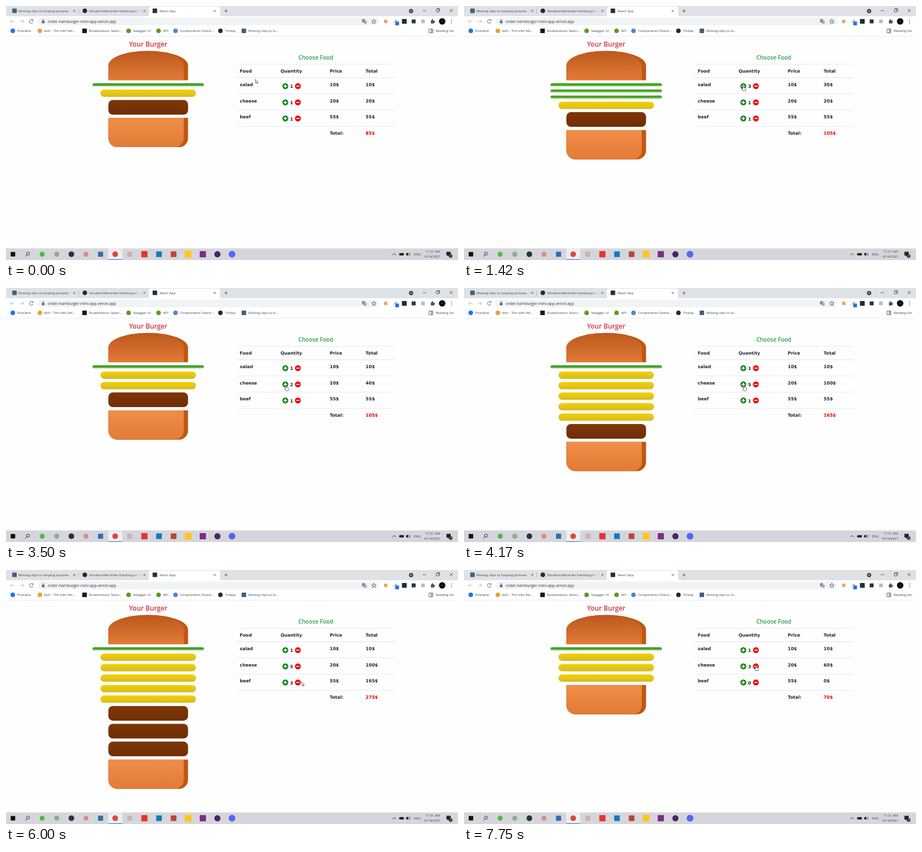
Recreate the animation shown at these times as an HTML page. Size 800x450 px, loop 8 s.

```html
<!DOCTYPE html>
<html lang="en">
<head>
<meta charset="utf-8">
<title>Burger order</title>
<style>
  html, body { margin: 0; width: 100%; height: 100%; overflow: hidden; background: #fefefe; }
  svg { display: block; width: 800px; height: 450px; }
  text { font-family: "Open Sans", "Noto Sans", sans-serif; font-size: 6px; fill: #3c4043; white-space: pre; }
  .title { font-weight: 600; text-anchor: middle; }
  .cell { font: bold 7.75px "DejaVu Sans", Verdana, sans-serif; fill: #212529; }
  .sum { fill: #e00000; }
  .line { fill: none; stroke: #50545a; stroke-width: .9; }
</style>
</head>
<body>
<svg viewBox="0 0 800 450" xmlns="http://www.w3.org/2000/svg">
  <defs id="defs"></defs>
  <g id="chrome"></g>
  <g id="burger"></g>
  <g id="table"></g>
  <g id="taskbar"></g>
  <g id="cursor">
    <path id="arrow" d="M0 0V6.6L1.6 5.2L2.7 7.7L3.7 7.2L2.7 4.9H4.8Z" fill="#fff" stroke="#222" stroke-width=".6"/>
    <path id="hand" d="M-.9 .8Q0 -.4 .9 .8V3.3L3.6 4Q4.4 4.2 4.3 5.2L3.6 9H-1L-3 5.8Q-3 4.8 -2 5L-.9 5.9Z" fill="#fff" stroke="#222" stroke-width=".65"/>
  </g>
</svg>
<script>
const LOOP = 8000, STEP = 1000 / 12;
const $ = id => document.getElementById(id);

// ---------- drawing helpers ----------
const rect = (x, y, w, h, fill, r = 0) => `<rect x="${x}" y="${y}" width="${w}" height="${h}" rx="${r}" fill="${fill}"/>`;
const disc = (x, y, r, fill) => `<circle cx="${x}" cy="${y}" r="${r}" fill="${fill}"/>`;
const box = (x, y, size, fill) => rect(x - size / 2, y - size / 2, size, size, fill, .8);
const line = (d, extra = "") => `<path class="line" d="${d}" ${extra}/>`;
const text = (x, y, s, extra = "") => `<text x="${x}" y="${y}" ${extra}>${s}</text>`;
const cell = (x, y, s, id = "") => text(x, y, s, `class="cell" id="${id}"`);
const cross = (x, y, r) => line(`M${x - r} ${y - r}l${2 * r} ${2 * r}m0 ${-2 * r}l${-2 * r} ${2 * r}`);
const gradient = (id, a, b) => `<linearGradient id="${id}" x2="0" y2="1"><stop stop-color="${a}"/><stop offset="1" stop-color="${b}"/></linearGradient>`;

// ---------- burger ----------
const MID = 251.7, TOP = 79.5, GAP = 5.6, BUN_W = 141, BUN_H = 52, SHADE = 7.6;
const FOODS = [
  { name: "salad", price: 10, max: 4, w: 197.2, h: 5.2, r: 2.6, colors: ["#228c1d", "#83c64a"] },
  { name: "cheese", price: 20, max: 5, w: 169, h: 13, r: 6.4, colors: ["#f4d004", "#d6bb22"] },
  { name: "beef", price: 55, max: 3, w: BUN_W, h: 26, r: 8, colors: ["#7f3608", "#702e05"] }
];
const BUNS = {
  topBun: { d: `M0 52V26A70.5 26 0 0 1 141 26V52Z`, colors: ["#bc581e", "#e27b36"] },
  lowBun: { d: `M0 0H141V36A16 16 0 0 1 125 52H16A16 16 0 0 1 0 36Z`, colors: ["#f08e4a", "#e27b36"] }
};

function bun(id) {
  const { d } = BUNS[id];
  return `<g id="${id}" transform="translate(${MID - BUN_W / 2} ${TOP})"><path d="${d}" fill="#c15711"/>
    <g clip-path="url(#${id}Clip)"><path d="${d}" fill="url(#${id}Fill)" transform="translate(${-SHADE} 0)"/></g></g>`;
}

function drawBurger() {
  $("defs").innerHTML =
    FOODS.map(f => gradient(f.name + "Fill", ...f.colors)).join("") +
    Object.entries(BUNS).map(([id, b]) =>
      gradient(id + "Fill", ...b.colors) + `<clipPath id="${id}Clip"><path d="${b.d}"/></clipPath>`).join("") +
    `<linearGradient id="fade"><stop stop-color="#dee1e6" stop-opacity="0"/><stop offset="1" stop-color="#dee1e6"/></linearGradient>`;
  $("burger").innerHTML =
    text(MID, 71.6, "Your Burger", `class="title" style="font-size:11.8px;fill:#d0323f"`) + bun("topBun") + bun("lowBun") +
    FOODS.map(f => `<g id="${f.name}">` +
      rect(MID - f.w / 2, 0, f.w, f.h, `url(#${f.name}Fill)`, f.r).repeat(f.max) + `</g>`).join("");
}

// ---------- order table ----------
const PLUS_X = 494.4, MINUS_X = 516.6, ROWS = [142, 170.8, 199.2];
const COLS = [413.8, 486, 573, 636.6];

function button(x, y, color, plus) {
  return disc(x, y, 5.2, color) + rect(x - 3, y - .85, 6, 1.7, "#fff") + (plus ? rect(x - .85, y - 3, 1.7, 6, "#fff") : "");
}

function drawTable() {
  let out = text(548.4, 95.2, "Choose Food", `class="title" style="font-size:10px;fill:#2b9c48"`);
  [103.2, 127, 155.8, 184.5, 213.3].forEach((y, i) =>
    out += rect(407.5, y - .4, 282, i === 1 ? 1 : .7, "#dee2e6"));
  ["Food", "Quantity", "Price", "Total"].forEach((s, i) => out += cell(COLS[i], 117.7, s));
  FOODS.forEach((f, i) => {
    const y = ROWS[i];
    out += cell(COLS[0], y, f.name) + cell(COLS[2], y, f.price + "$") + cell(COLS[3], y, "", f.name + "Cost") +
      button(PLUS_X, y, "#0b800b", true) + button(MINUS_X, y, "#f00000", false) + cell(502.8, y + 3.4, "", f.name + "Count");
  });
  $("table").innerHTML = out + cell(COLS[2], 228, "Total:") +
    text(COLS[3], 228, "", `class="cell sum" id="sum"`);
}

// ---------- browser frame ----------
function drawChrome() {
  let out = rect(0, 0, 800, 18.5, "#dee1e6") +
    `<path d="M250 18.5Q253 18.5 253 15V4Q253 1 256 1H376Q379 1 379 4V15Q379 18.5 382 18.5Z" fill="#fff"/>` +
    rect(0, 18.2, 800, 35.4, "#fff") + rect(0, 53.3, 800, .7, "#e3e5e8") +
    box(15, 8.5, 8, "#456078") + text(22, 11, "Moving clips to looping pictures", `style="font-size:6.05px"`) +
    disc(139.5, 8.5, 4, "#24292e") + text(147.5, 11, "khoabrindle/order-hamburger-m") +
    rect(222, 3, 18, 12, "url(#fade)") + rect(239, 3, 3, 12, "#dee1e6") +
    box(263.5, 8.5, 8, "#20303a") + text(272, 11, "React App") +
    [121, 245, 369.5].map(x => cross(x, 8.7, 1.8)).join("") + rect(128, 4.5, .6, 9, "#9a9da3") +
    line("M386.5 8.8h6M389.5 5.8v6") +
    disc(717, 9, 3.8, "#3c4043") + `<path d="M715.4 8.2h3.2l-1.6 2.2z" fill="#fff"/>` +
    line("M737.5 8.3h6M761.5 5.8h4.6v4.6h-4.6zM763 5.8v-1.3h4.5v4.5h-1.3", `stroke-width=".7"`) + cross(788, 8, 2.6);

  out += line("M14.5 27.2H8M11 24.2l-3 3l3 3", `opacity=".45"`) + line("M25 27.2h6.5M28.5 24.2l3 3l-3 3", `opacity=".45"`) +
    line("M47.4 25.2A3.3 3.3 0 1 0 48 28M48 23.4v2.4h-2.4") +
    rect(56, 20.5, 604, 13.6, "#f1f3f4", 6.8) +
    rect(63.5, 26.6, 4.6, 3.8, "#5f6368", .5) + line("M64.5 26.8v-1.4a1.3 1.3 0 0 1 2.6 0v1.4", `stroke-width=".7"`) +
    text(74, 29.7, "order-hamburger-mini-app.vercel.app", `style="font-size:6.85px;fill:#303338"`) +
    rect(630.3, 23.5, 5, 5.6, "#5f6368", .6) + rect(633.3, 26, 5, 5.6, "#a7abb0", .6) + text(631, 28, "A", `style="font-size:4.5px;fill:#fff"`) +
    line("M651 23.4l1.1 2.6l2.8.2l-2.1 1.9l.6 2.8l-2.4-1.5l-2.4 1.5l.6-2.8l-2.1-1.9l2.8-.2z", `stroke-width=".7"`) +
    box(672, 27.3, 6, "#e7a85f") +
    line("M686 29.5l4.5-4.5M689 24l3.2 3.2", `stroke-width="1.4"`) + rect(689, 27.6, 6.6, 6.6, "#2a6fdb", .8) +
    box(705, 27.3, 8.5, "#17303c") + box(721.5, 27.3, 7, "#32343a") + box(738, 27.3, 6.5, "#b9bcc2") +
    rect(752, 25.5, 5.8, 5.4, "#50545a", .6) + disc(754.8, 25, 1.4, "#50545a") + disc(758, 28, 1.4, "#50545a") +
    disc(772, 27.2, 5.7, "#08080a") + rect(771, 26.7, 2, 1, "#77777c") +
    [24.3, 27.2, 30.1].map(y => disc(788.5, y, .8, "#50545a")).join("");

  const marks = [
    [12, "#1877f2", "Postlane", 20], [60, "#e2a63a", "dich - Tìm trên Vel...", 67],
    [139, "#16181b", "Runelookout: Searc...", 147, true], [217, "#5c9a22", "Swagger UI", 225],
    [270, "#5c9a22", "API", 278], [300, "#4c86d8", "Components Overvi...", 308],
    [379.5, "#24292e", "Tinbay", 388], [421, "#456078", "Moving clips to lo...", 429, true]
  ];
  marks.forEach(([x, color, label, tx, square]) =>
    out += (square ? box(x, 44, 8, color) : disc(x, 44, 4, color)) + text(tx, 46.3, label));
  out += line("M748.8 40.8h6.6v6.6h-6.6zM752.6 41v6.4M753.5 43h1.4M753.5 45h1.4", `stroke-width=".8"`) +
    text(760.5, 46.3, "Reading list");
  $("chrome").innerHTML = out;
}

function drawTaskbar() {
  const icons = [
    ["#111", 8], 0, ["#55b84a", 9, 1], ["#8fa99a", 9, 1], ["#26343a", 10, 1], ["#d98d8d", 9, 1], ["#2f6fa8", 9],
    ["#db4a3a", 10, 1], ["#c9b3b3", 9], ["#e5332f", 11], ["#1279c6", 10], ["#b8453c", 10], ["#fcc61c", 12],
    ["#7b2c86", 11], ["#4b2563", 11, 1], ["#5865f2", 12, 1]
  ];
  let out = rect(0, 429.5, 800, 20.5, "#d5d6dc") + rect(181, 429.5, 25, 20.5, "#eceef2") + rect(181, 448.8, 25, 1.2, "#3b83c4");
  icons.forEach((icon, i) => {
    const x = 12.3 + i * 25.85;
    if (!icon) out += disc(x + .8, 438.7, 2.7, "none").replace("/>", ` stroke="#222" stroke-width=".9"/>`) +
      line(`M${x - 1.2} 440.8l-2.8 3`, `style="stroke:#222"`);
    else out += icon[2] ? disc(x, 439.8, icon[1] / 2, icon[0]) : box(x, 439.8, icon[1], icon[0]);
  });
  out += line("M684 441.5l3.2-3.2l3.2 3.2", `style="stroke:#222"`) +
    rect(696.5, 437.7, 7.6, 4.4, "#222", .5) + rect(695.4, 439, 1, 2, "#222") +
    `<path d="M708 438.3h1.6l2.2-2v7l-2.2-2H708z" fill="#222"/>` +
    line("M713 438.3q1.2 1.5 0 3M714.5 437.2q2.2 2.6 0 5.2", `stroke-width=".6"`) +
    text(722, 442, "ENG") + text(755.2, 437.3, "11:31 AM", `text-anchor="middle"`) +
    text(754.8, 446.2, "9/14/2021", `text-anchor="middle"`) +
    `<path d="M779.5 435.5h7.6v6.5h-3l-2 2v-2h-2.6z" fill="#222"/>` + disc(787, 443, 3.2, "#34373c") +
    text(787, 444.8, "1", `text-anchor="middle" style="font-size:4.6px;fill:#fff"`);
  $("taskbar").innerHTML = out;
}

// ---------- motion ----------
// [time, salad, cheese, beef]
const ORDERS = [
  [0, 1, 1, 1], [1080, 2, 1, 1], [1330, 3, 1, 1], [1670, 4, 1, 1], [2170, 3, 1, 1], [2420, 2, 1, 1], [2830, 1, 1, 1],
  [3420, 1, 2, 1], [3830, 1, 3, 1], [4000, 1, 4, 1], [4170, 1, 5, 1], [4920, 1, 5, 2], [5420, 1, 5, 3],
  [6420, 1, 5, 2], [6670, 1, 5, 1], [6830, 1, 5, 0], [7500, 1, 4, 0], [7750, 1, 3, 0]
];
// [time, x, y]
const PATH = [
  [0, 441.5, 130], [90, 441.5, 130], [330, 458, 98], [500, 476, 80], [670, 491, 112], [750, 495, 145], [830, 494.3, 141],
  [1750, 494.3, 141], [2000, 517.2, 141], [2917, 517.2, 141], [3250, 496, 173], [4170, 496, 173], [4260, 496, 173],
  [4750, 495, 200], [5583, 495, 200], [5833, 528, 203], [6000, 523.5, 198.2], [6084, 523.5, 198.2],
  [6250, 516.8, 199], [7000, 516.8, 199], [7333, 516.8, 169.5], [LOOP, 516.8, 169.5]
];

function cursorAt(t) {
  const i = Math.max(1, PATH.findIndex(p => p[0] > t));
  const [a, b] = [PATH[i - 1], PATH[i]];
  const k = (t - a[0]) / (b[0] - a[0]);
  return [a[1] + (b[1] - a[1]) * k, a[2] + (b[2] - a[2]) * k];
}

function showOrder(counts) {
  let y = TOP + BUN_H + GAP, sum = 0;
  FOODS.forEach((f, i) => {
    [...$(f.name).children].forEach((el, n) => {
      el.style.display = n < counts[i] ? "" : "none";
      el.setAttribute("y", y + n * (f.h + GAP));
    });
    y += counts[i] * (f.h + GAP);
    sum += counts[i] * f.price;
    $(f.name + "Count").textContent = counts[i];
    $(f.name + "Cost").textContent = counts[i] * f.price + "$";
  });
  $("lowBun").setAttribute("transform", `translate(${MID - BUN_W / 2} ${y})`);
  $("sum").textContent = sum + "$";
}

function showCursor(x, y) {
  const over = ROWS.some(r => [PLUS_X, MINUS_X].some(b => Math.hypot(x - b, y - r) < 5.4));
  $("cursor").setAttribute("transform", `translate(${x} ${y})`);
  $("hand").style.display = over ? "" : "none";
  $("arrow").style.display = over ? "none" : "";
}

let shown = -1;
function render(now) {
  const step = Math.floor((now % LOOP + 4) / STEP) % (LOOP / STEP);
  if (step !== shown) {
    shown = step;
    const t = step * STEP;
    showOrder(ORDERS.filter(o => o[0] <= t + 5).pop().slice(1));
    showCursor(...cursorAt(t));
  }
}

drawBurger();
drawTable();
drawChrome();
drawTaskbar();
const start = performance.now();
function tick() {
  render(performance.now() - start);
  requestAnimationFrame(tick);
}
tick();
</script>
</body>
</html>
```
